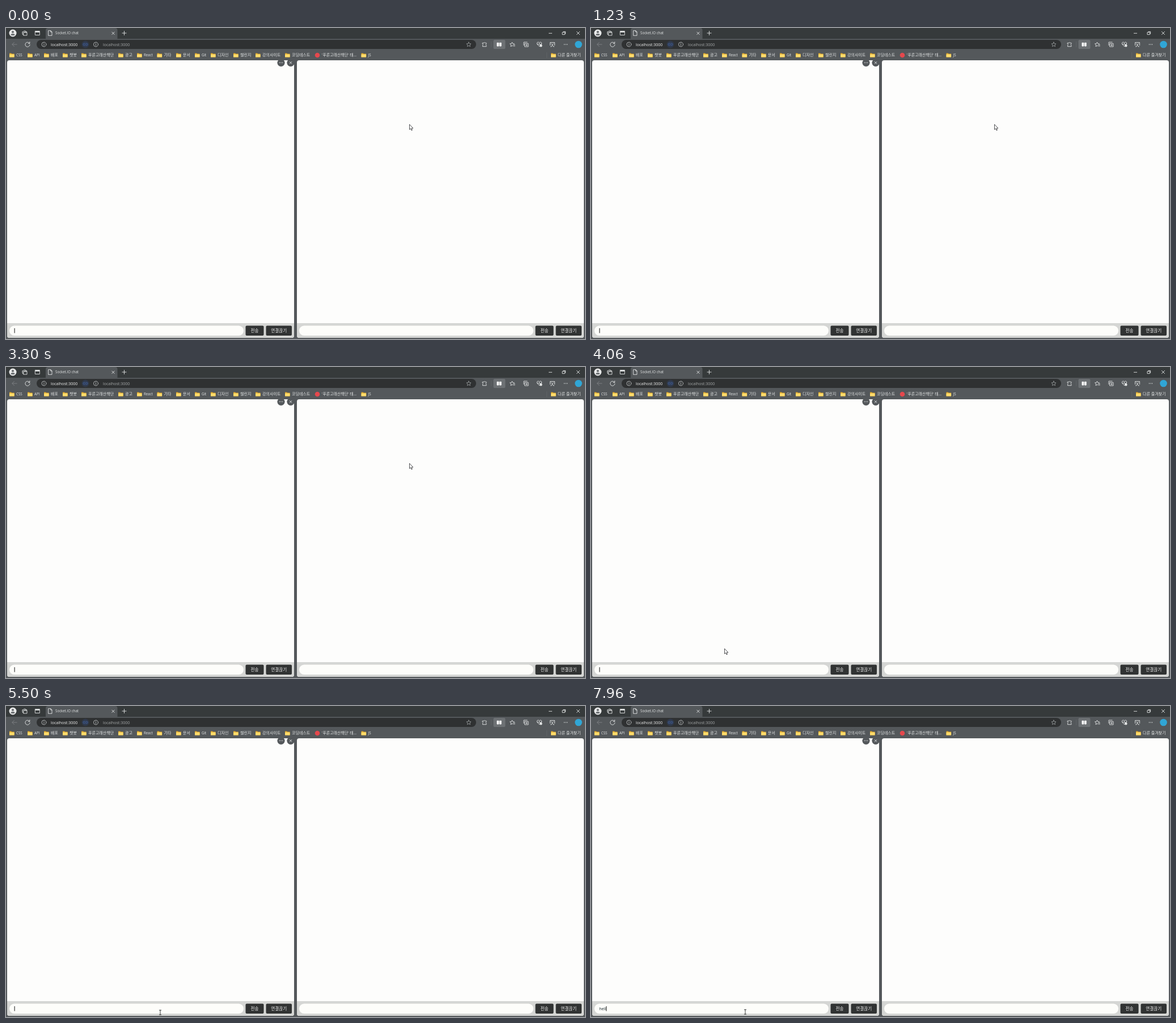
Recreate the animation shown at these times as an HTML page with a canvas. Size 1021 px wide and 549 px high, loop 8000 ms.

```html
<!DOCTYPE html>
<html lang="ko">
<head>
<meta charset="utf-8">
<title>Socket.IO chat</title>
<style>
html, body { margin: 0; width: 100%; height: 100%; overflow: hidden; background: #54585b; }
canvas { display: block; width: 1021px; height: 549px; }
</style>
</head>
<body>
<canvas id="stage"></canvas>
<script>
const W = 1021, H = 549, LOOP = 8000;
const canvas = document.getElementById('stage');
const dpr = window.devicePixelRatio || 1;
canvas.width = W * dpr;
canvas.height = H * dpr;
const view = canvas.getContext('2d');
const backdrop = document.createElement('canvas');
backdrop.width = canvas.width;
backdrop.height = canvas.height;
let g = backdrop.getContext('2d');
g.scale(dpr, dpr);
view.scale(dpr, dpr);

const FONT = '"Open Sans", "Noto Sans CJK KR", "Noto Sans CJK", "Noto Sans", sans-serif';
const LIGHT = '#e4e6e6', CHROME = '#54585b', DARK = '#363a3b', FIELD = '#2f3132';

function box(x, y, w, h, fill, r = 0) {
  g.fillStyle = fill;
  g.beginPath();
  g.roundRect(x, y, w, h, r);
  g.fill();
}

function disc(x, y, r, fill) {
  g.fillStyle = fill;
  g.beginPath();
  g.arc(x, y, r, 0, Math.PI * 2);
  g.fill();
}

function text(str, x, y, size, fill = LIGHT, align = 'left') {
  g.font = `${size}px ${FONT}`;
  g.textAlign = align;
  g.textBaseline = 'alphabetic';
  g.fillStyle = fill;
  g.fillText(str, x, y);
}

// Strokes an icon path whose origin is the icon's centre.
function icon(x, y, d, color = LIGHT, width = 0.9, fill) {
  const p = new Path2D(d);
  g.save();
  g.translate(x, y);
  g.lineWidth = width;
  g.lineJoin = g.lineCap = 'round';
  if (fill) { g.fillStyle = fill; g.fill(p); }
  if (color) { g.strokeStyle = color; g.stroke(p); }
  g.restore();
}

const CROSS = 'M-2.2 -2.2L2.2 2.2M2.2 -2.2L-2.2 2.2';
const STAR = 'M0 -4L1.2 -1.4L4 -1.1L1.9 .8L2.5 3.7L0 2.2L-2.5 3.7L-1.9 .8L-4 -1.1L-1.2 -1.4Z';

function dots(x, y) {
  for (const dx of [-2.6, 0, 2.6]) disc(x + dx, y, 0.7, LIGHT);
}

function info(x, y) {
  icon(x, y, 'M4 0A4 4 0 1 1 -4 0A4 4 0 1 1 4 0M0 -.4V2', '#c9cccd', 0.8);
  disc(x, y - 1.9, 0.6, '#c9cccd');
}

function folder(x) {
  icon(x, 48, 'M0 -3.6H3.2L4.4 -2.4H8.6V3.6H0Z', null, 0, '#e0a92e');
  box(x, 46.6, 8.6, 5, '#ffdc6c', 0.6);
}

function titleBar() {
  box(0, 0, W, 19, DARK);
  box(70, 0, 126.5, 20, CHROME, [4, 4, 0, 0]);
  disc(12, 9, 6.5, '#e9eaea');
  disc(12, 7, 2, '#696d70');
  icon(12, 9, 'M-3.5 3.4Q-3.5 1 0 1T3.5 3.4Q0 5.2 -3.5 3.4Z', null, 0, '#696d70');
  icon(33, 9, 'M-4 -2L0 -4L4 -2M-4 -2V2L-2 3.5M-2 -1H4V4H-2Z M-.5 -1V-2H2.5V-1');
  icon(55.5, 9, 'M-3.8 -3.5H3.8V3.5H-3.8Z');
  box(51.7, 5.5, 7.6, 2.3, LIGHT);
  icon(78, 9, 'M-3 -4.3H.8L3 -2V4.3H-3ZM.8 -4.3V-2H3');
  text('Socket.IO chat', 87, 11.3, 6.2);
  icon(189, 9.3, CROSS);
  icon(208.5, 9, 'M-3.5 0H3.5M0 -3.5V3.5');
  icon(960, 9.3, 'M-2.6 0H2.6');
  icon(984, 9, 'M-2.6 -1.3H1.3V2.6H-2.6ZM-1.2 -2.6H2.6V1.2');
  icon(1009, 9, 'M-2.6 -2.6L2.6 2.6M2.6 -2.6L-2.6 2.6');
}

function toolBar() {
  icon(15, 29, 'M4.2 0H-4.2M-.6 -3.6L-4.2 0L-.6 3.6', '#7f8386');
  icon(38, 29, 'M3.6 -1.8A4.1 4.1 0 1 0 4.1 .5M3.8 -4.4V-1.7H1.2');
  box(54, 21, 775, 16, FIELD, 8);
  info(67, 29);
  text('localhost:3000', 79, 31.6, 7, '#f1f2f2');
  disc(140, 29, 6.5, '#30394a');
  icon(140, 29, 'M-.8 -2H-2A2 2 0 0 0 -2 2H-.8M.8 -2H2A2 2 0 0 1 2 2H.8M-1.8 0H1.8', '#405f9c');
  info(158.5, 29);
  text('localhost:3000', 171, 31.6, 7, '#a5a8a9');
  icon(816, 29, STAR, '#9fa3a4', 0.8);
  icon(844, 29, 'M-3.5 -2.6H-1A1.3 1.3 0 0 1 1.4 -2.6H3V-.8A1.3 1.3 0 0 0 3 1.6V3.7H-3.5V1.6A1.3 1.3 0 0 0 -3.5 -.8Z');
  box(855, 24, 0.6, 10, '#666a6d');
  box(859.5, 21, 21, 16, '#6d7174', 2);
  box(865.5, 25.8, 3.7, 6.6, '#fff', 0.8);
  box(870, 25.8, 3.7, 6.6, '#fff', 0.8);
  icon(892.5, 29, 'M1.7 2.8L0 2.2L-2.5 3.7L-1.9 .8L-4 -1.1L-1.2 -1.4L0 -4L1.2 -1.4L4 -1.1M2 .7H4.8M3 2.8H4.8');
  icon(917, 29, 'M-2 -1.7H4V4H-2ZM-4 1.5V-4H2M1 -.2V2.6M-.4 1.2H2.4');
  icon(940.5, 28.5, 'M0 4L-4 0Q-5 -3 -2.4 -3.6Q-.6 -3.7 0 -2Q.6 -3.7 2.4 -3.6Q5 -3 4 0Z', LIGHT, 0.9);
  icon(941, 28.8, 'M-4 0H-1.6L-.5 -1.6L.7 1.6L1.5 0H3');
  disc(943.3, 31.3, 2.2, LIGHT);
  icon(963.5, 29, 'M-4 1.5V-3.5H4V1.5M-2 -1.8L1.7 3.6M2 -1.8L-1.7 3.6M-3 3.8H-1.8M1.8 3.8H3');
  dots(987, 29);
  disc(1009.5, 29, 6.3, '#30a6d6');
}

function bookmarks() {
  const items = [
    [6, 'CSS'], [38, 'API'], [67, '배포'], [100, '챗봇'], [133, '푸른고래산책단'],
    [198, '광고'], [231, 'React'], [266.5, '기타'], [300, '문서'], [333, 'Git'],
    [361, '디자인'], [401, '챌린지'], [440, '강의사이트'], [492, '코딩테스트'],
    [626.5, 'JS'], [961, '다른 즐겨찾기']
  ];
  for (const [x, label] of items) {
    folder(x);
    text(label, x + 12, 50.3, /^\w/.test(label) ? 6.2 : 7);
  }
  disc(549, 48, 4.3, '#e5484d');
  text("'푸른고래산책단' 태...", 557, 50.3, 6.9);
  box(953.5, 43, 0.6, 10, '#696d70');
}

function button(x, w, label) {
  box(x, 525.5, w, 17.5, '#313333', 2);
  text(label, x + w / 2, 536.8, 7.6, '#f5f5f5', 'center');
}

function panel(x) {
  box(x, 57, 506, 490, '#fdfdfc', 4);
  box(x, 521, 506, 26, '#d5d6d4', [0, 0, 4, 4]);
  box(x + 4, 525.5, 413, 17.5, '#fdfdfa', 8.7);
  button(x + 420.5, 32, '전송');
  button(x + 456.5, 45.5, '연결끊기');
}

function drawBackdrop() {
  box(0, 0, W, H, CHROME);
  titleBar();
  toolBar();
  bookmarks();
  panel(2);
  panel(513);
  disc(485, 61.3, 6.6, CHROME);
  disc(502, 61.3, 6.6, CHROME);
  dots(485, 61.3);
  icon(502, 61.3, 'M-1.8 -1.8L1.8 1.8M1.8 -1.8L-1.8 1.8');
}

// Pointer stops: time, x, y, eased between neighbours.
const PATH = [
  [3400, 711, 170], [4050, 235, 497], [4110, 235, 497], [4500, 224, 538],
  [4780, 224, 538], [5300, 272, 541], [6900, 272, 541], [7000, 272, 540]
];
const IBEAM_AT = 4950;

function pointerAt(t) {
  const i = PATH.findIndex(k => k[0] > t);
  if (i === 0) return PATH[0].slice(1);
  if (i < 0) return PATH[PATH.length - 1].slice(1);
  const [t0, x0, y0] = PATH[i - 1], [t1, x1, y1] = PATH[i];
  const u = (t - t0) / (t1 - t0), e = u * u * (3 - 2 * u);
  return [x0 + (x1 - x0) * e, y0 + (y1 - y0) * e];
}

function drawPointer(t) {
  const [x, y] = pointerAt(t);
  if (t < IBEAM_AT) {
    icon(x + 0.5, y + 0.5, 'M0 0V8.8L2 7L3.5 10.3L4.9 9.7L3.5 6.5H6Z', '#26282a', 0.8, '#fff');
  } else {
    icon(x, y, 'M-1.7 -4H1.7M0 -4V4M-1.7 4H1.7', '#2b2d2e', 0.9);
  }
}

const KEYS = [7400, 7540, 7700, 7860];
const BLINK = 530, BLINK_START = 760;

function drawField(t) {
  const count = KEYS.filter(k => t >= k).length;
  const typed = 'hell'.slice(0, count);
  text(typed, 14.5, 536.8, 7.1, '#1c2b30');
  const caretOn = count > 0 || Math.floor((t - BLINK_START + 4 * BLINK) / BLINK) % 2 === 0;
  if (caretOn) box(14.6 + g.measureText(typed).width, 530, 1, 8.5, '#111');
}

function frame(now) {
  const t = (now - start) % LOOP;
  g.drawImage(backdrop, 0, 0, W, H);
  drawField(t);
  drawPointer(t);
  requestAnimationFrame(frame);
}

drawBackdrop();
g = view;
const start = performance.now();
frame(start);
</script>
</body>
</html>
```
